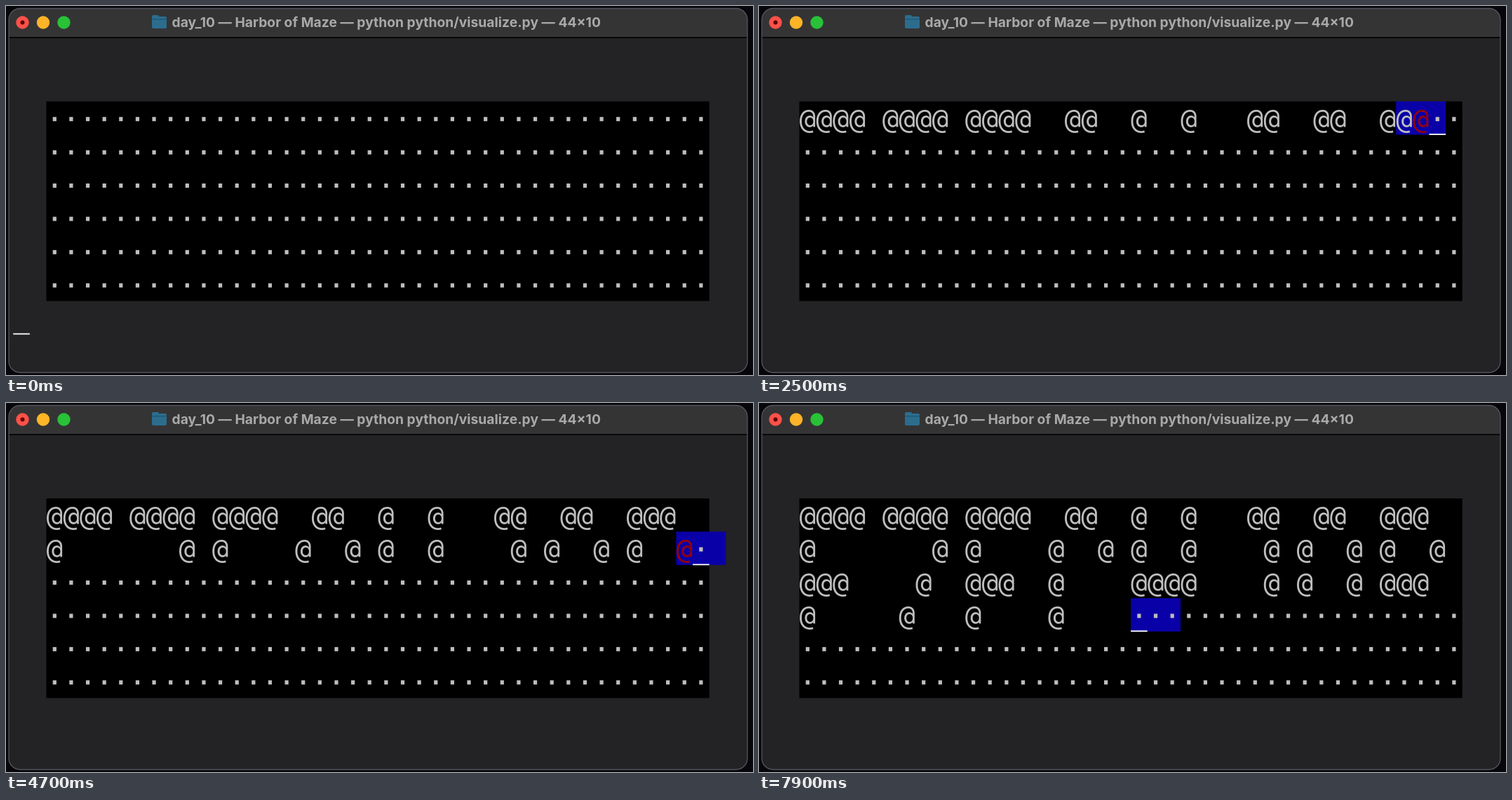
These frames come from a looping animation (1065 px wide and 526 px high, 8000 ms). An HTML page with a canvas:

```html
<!DOCTYPE html>
<html lang="en">
<head>
<meta charset="utf-8">
<title>CRT visualizer</title>
<style>
  html, body { margin: 0; width: 100%; height: 100%; overflow: hidden; background: #07070b; }
  canvas { display: block; }
</style>
</head>
<body>
<canvas id="stage" width="1065" height="526"></canvas>
<script>
const ctx = document.getElementById('stage').getContext('2d');

const LOOP = 8000, STEP = 100;        // the screen refreshes ten times a second
const START = 519, CYCLE = 52.94;     // first cycle and cycle length in ms
const COLS = 40, ROWS = 6;
const LEFT = 57.5, TOP = 136, CELL_W = 23.63, CELL_H = 47.42;
const GREY = '#bebebe', RED = '#960006', BLUE = '#0a00a8';

const image = [
  '@@@@ @@@@ @@@@  @@  @  @   @@  @@  @@@  ',
  '@       @ @    @  @ @  @    @ @  @ @  @ ',
  '@@@    @  @@@  @    @@@@    @ @  @ @@@  ',
  '@     @   @    @    @  @'
];

const colX = col => LEFT + col * CELL_W;
const rowY = row => TOP + row * CELL_H;

function rect(color, x, y, w, h) {
  ctx.fillStyle = color;
  ctx.fillRect(x, y, w, h);
}

function disc(color, x, y, r) {
  ctx.fillStyle = color;
  ctx.beginPath();
  ctx.arc(x, y, r, 0, Math.PI * 2);
  ctx.fill();
}

// Left column of the three-wide sprite while the given cell is drawn.
function spriteLeft(line, col) {
  if (line[col] === '@') return Math.max(line.lastIndexOf(' ', col) + 1, col - 1);
  const next = line.indexOf('@', col);
  return next >= 0 ? next : line.lastIndexOf('@') - 2;
}

function drawWindow() {
  rect('#07070b', 0, 0, 1065, 526);
  ctx.save();
  ctx.beginPath();
  ctx.roundRect(4, 3.5, 1053, 519, 16);
  ctx.fillStyle = '#232325';
  ctx.fill();
  ctx.clip();
  rect('#343435', 4, 3, 1053, 41);
  rect('#08080a', 4, 44, 1053, 2);
  ctx.restore();
  ctx.strokeStyle = '#55555f';
  ctx.lineWidth = 1.3;
  ctx.stroke();

  ['#ff5148', '#fdb427', '#28c138'].forEach((color, i) => disc(color, 23.5 + i * 29.5, 23.5, 9.2));
  disc('#5c0604', 23.5, 23.5, 3);

  ctx.fillStyle = '#2c6d8e';
  ctx.beginPath();
  ctx.roundRect(208, 13, 10, 8, 2);
  ctx.roundRect(208, 15, 21, 17, 2);
  ctx.fill();
  rect('#225873', 208, 18, 21, 1.5);

  ctx.font = '700 19.3px Inter, sans-serif';
  ctx.textAlign = 'center';
  ctx.fillStyle = '#a9a9a9';
  ctx.fillText('day_10 — Harbor of Maze — python python/visualize.py — 44×10', 542.2, 30);
}

function drawScreen(current) {
  rect('#000', LEFT, TOP, COLS * CELL_W, ROWS * CELL_H);
  const row = Math.floor(current / COLS), col = current % COLS;
  if (current >= 0) {
    rect(BLUE, colX(spriteLeft(image[row], col)), rowY(row), 3 * CELL_W, CELL_H);
  }

  ctx.font = '39.25px "DejaVu Sans Mono", monospace';
  ctx.textAlign = 'left';
  const box = ctx.measureText('@');
  const baseline = 28.5 + (box.actualBoundingBoxAscent - box.actualBoundingBoxDescent) / 2;

  for (let i = 0; i < COLS * ROWS; i++) {
    const r = Math.floor(i / COLS), c = i % COLS;
    if (i > current) {
      rect(GREY, colX(c) + 9.2, rowY(r) + 22.2, 5.2, 6);
    } else if (image[r][c] === '@') {
      ctx.fillStyle = i === current ? RED : GREY;
      ctx.fillText('@', colX(c), rowY(r) + baseline);
    }
  }

  // The cursor waits below the screen until the first cycle.
  const [cursorCol, cursorRow] = current < 0 ? [-2, ROWS] : [col + 1, row];
  rect('#fff', colX(cursorCol), rowY(cursorRow + 1) - 1.4, CELL_W, 1.8);
}

function frame() {
  const time = Math.floor(performance.now() % LOOP / STEP) * STEP;
  drawWindow();
  drawScreen(time < START ? -1 : Math.floor((time - START) / CYCLE));
  requestAnimationFrame(frame);
}
frame();
</script>
</body>
</html>
```
